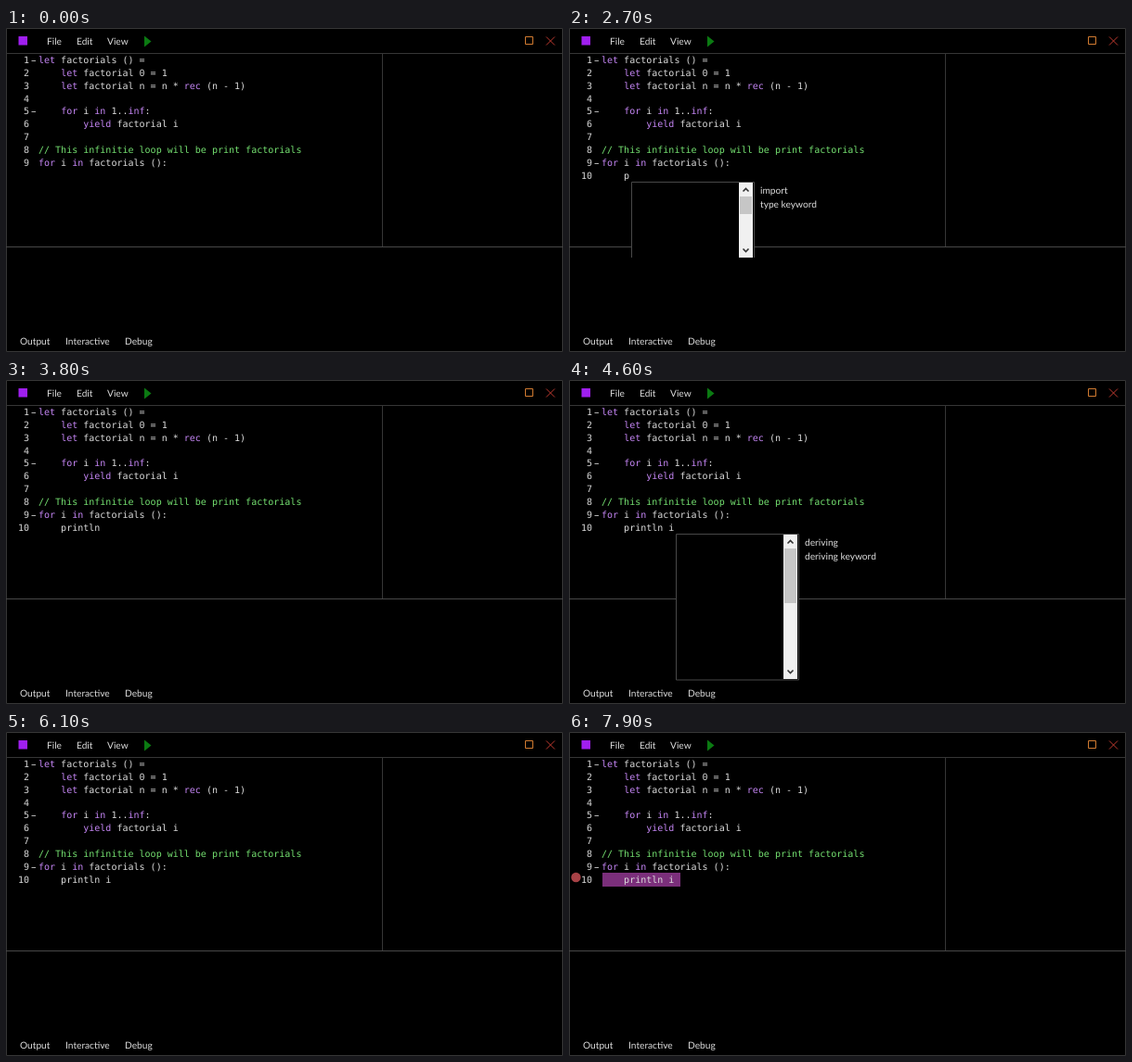
Recreate the animation shown at these times as an HTML page. Size 600 by 350 pixels, loop 8 s.

```html
<!DOCTYPE html>
<html lang="en">
<head>
<meta charset="utf-8">
<title>Code editor</title>
<style>
  html, body { margin: 0; width: 100%; height: 100%; overflow: hidden; background: #000; }
  svg { display: block; width: 600px; height: 350px; }
  text { white-space: pre; text-rendering: geometricPrecision; }
  .code { font: 10.02px "DejaVu Sans Mono", monospace; fill: #dcdcdc; }
  .num { fill: #d6d6d6; text-anchor: end; }
  .ui { font: 10.2px Lato, "Open Sans", sans-serif; fill: #dcdcdc; }
  .item { fill: #fff; }
  .key { fill: #c586f5; }
  .dimkey { fill: #9a55b5; }
  .note { fill: #74e070; }
  .frame { fill: none; stroke: #484848; }
  .edge { fill: none; stroke: #363636; }
  .chevron { fill: none; stroke: #333; stroke-width: 1.6; }
</style>
</head>
<body>
<svg id="stage" viewBox="0 0 600 350"></svg>
<script>
const NS = "http://www.w3.org/2000/svg";
const LOOP = 8000;
const KEYWORDS = "let|rec|for|inf|in|yield";
const stage = document.getElementById("stage");
const timed = [];

function add(parent, tag, attrs = {}, content = "") {
  const el = document.createElementNS(NS, tag);
  for (const name in attrs) el.setAttribute(name, attrs[name]);
  el.textContent = content;
  parent.appendChild(el);
  return el;
}
const path = (parent, d, attrs) => add(parent, "path", { d, ...attrs });
const rect = (parent, x, y, width, height, fill) =>
  add(parent, "rect", { x, y, width, height, fill });
const label = (parent, x, y, content, cls = "ui") =>
  add(parent, "text", { x, y, class: cls }, content);

// A group seen only during the given [from, to) spans
function during(...spans) {
  const el = add(stage, "g");
  timed.push({ el, spans });
  return el;
}

const baseline = line => 162.5 - (10 - line) * 13.83;

function codeLine(parent, line, source) {
  const el = add(parent, "text", { x: 35, y: baseline(line), class: "code" });
  if (source.startsWith("//")) {
    el.classList.add("note");
    el.textContent = source;
    return;
  }
  // The captured keywords land at the odd indices
  source.split(new RegExp(`\\b(${KEYWORDS})\\b`)).forEach((part, i) =>
    add(el, "tspan", i % 2 ? { class: "key" } : {}, part));
}
const lineNumber = (parent, n) => label(parent, 25, baseline(n), n, "code num");
const foldMark = (parent, n) =>
  rect(parent, 27.5, Math.round(baseline(n)) - 3, 4.5, 1, "#b0b0b0");
const caret = (parent, x) => rect(parent, x, 152.5, 1, 13, "#e0e0e0");

// Window
path(stage, "M0.5 0.5H599.5V349.5H0.5ZM0 27.5H600M405.5 28V236", { class: "edge" });
path(stage, "M0 236.5H600", { class: "frame" });
rect(stage, 13.5, 9, 9.5, 9.5, "#a01ff0");
[["File", 44], ["Edit", 76], ["View", 109]].forEach(([s, x]) => label(stage, x, 18, s));
[["Output", 15], ["Interactive", 64], ["Debug", 128]].forEach(([s, x]) => label(stage, x, 342, s));
path(stage, "M149 8.5L156.5 14.5L149 20.5Z", { fill: "#0b7a12" });
path(stage, "M559.5 9.5H567.5V17.5H559.5Z", { fill: "none", stroke: "#d07a30" });
path(stage, "M582 9.5L591 18.5M591 9.5L582 18.5", { stroke: "#c03a30" });

// Program
const program = [
  "let factorials () =",
  "    let factorial 0 = 1",
  "    let factorial n = n * rec (n - 1)",
  "",
  "    for i in 1..inf:",
  "        yield factorial i",
  "",
  "// This infinitie loop will be print factorials",
  "for i in factorials ():"
];
const selection = during([6700, LOOP]);
rect(selection, 36, 152, 84, 15, "#7b2f7b");
program.forEach((source, i) => {
  lineNumber(stage, i + 1);
  if (source) codeLine(stage, i + 1, source);
});
foldMark(stage, 1);
foldMark(stage, 5);
lineNumber(during([1500, LOOP]), 10);
foldMark(during([2400, LOOP]), 9);

// Typed line
const typing = [
  [2500, "p"], [2900, "pr"], [3300, "pri"], [3400, "prin"],
  [3600, "println"], [4500, "println i"]
];
typing.forEach(([from, word], i) => {
  const to = i + 1 < typing.length ? typing[i + 1][0] : LOOP;
  codeLine(during([from, to]), 10, "    " + word);
});
caret(during([1900, 2100]), 35.5);
caret(during([5500, 6000], [6600, 6700]), 119);

// Completion popups
function scrollList(parent, x, bottom, thumbEnd, closed) {
  const right = x + 132;
  rect(parent, x, 166, 132, bottom - 166, "#000");
  path(parent, `M${x + .5} ${bottom}V166.5H${right + .5}V${bottom}${closed ? "Z" : ""}`, { class: "frame" });
  const left = right - 16, mid = right - 8.5, end = bottom - (closed ? 1 : 0);
  rect(parent, left, 167, 15, end - 167, "#f0f0f0");
  rect(parent, left + 1, 182, 13, thumbEnd - 182, "#c6c6c6");
  path(parent, `M${mid - 3} 176.5l3 -3l3 3M${mid - 3} ${end - 9.5}l3 3l3 -3`, { class: "chevron" });
}
function hint(parent, x, first, second) {
  label(parent, x, 178.5, first);
  label(parent, x, 194, second);
}
function cube(parent, x, y) {
  const face = (d, fill) => path(parent, `M${x} ${y}${d}`, { fill });
  face("l6 -3.2l-6 -3.2l-6 3.2z", "#f8cf2c");
  face("l-6 -3.2v6.6l6 3.2z", "#28b4e8");
  face("l6 -3.2v6.6l-6 3.2z", "#c63fd0");
}

const broad = during([2600, 2900]);
scrollList(broad, 67, 248, 201, false);
hint(broad, 206, "import", "type keyword");

const narrow = during([2900, 3600]);
rect(narrow, 67, 165, 133, 36, "#000");
path(narrow, "M67.5 165.5H199.5V200.5H67.5Z", { class: "frame" });
rect(narrow, 69, 167, 129, 15.5, "#3a3a3a");
["println", "print"].forEach((name, i) => {
  const y = 178.5 + i * 15.7;
  cube(narrow, 76.5, y - 3.5);
  label(narrow, 86, y, name, "ui item");
});
const signature = during([2900, 3700]);
const first = label(signature, 206, 178.5, "");
add(first, "tspan", { class: "dimkey" }, "let");
add(first, "tspan", {}, " println x");
label(signature, 206, 194, "this is built-in fun");

scrollList(during([4500, 4800]), 115, 324, 241, true);
hint(during([4500, 5300]), 254, "deriving", "deriving keyword");

// Breakpoint
add(during([7400, LOOP]), "circle", { cx: 7.5, cy: 157, r: 5.2, fill: "#a84246" });

function draw(now) {
  const t = now % LOOP;
  for (const { el, spans } of timed) {
    const shown = spans.some(([from, to]) => t >= from && t < to);
    el.style.display = shown ? "" : "none";
  }
}
function tick() {
  draw(performance.now());
  requestAnimationFrame(tick);
}
tick();
</script>
</body>
</html>
```
